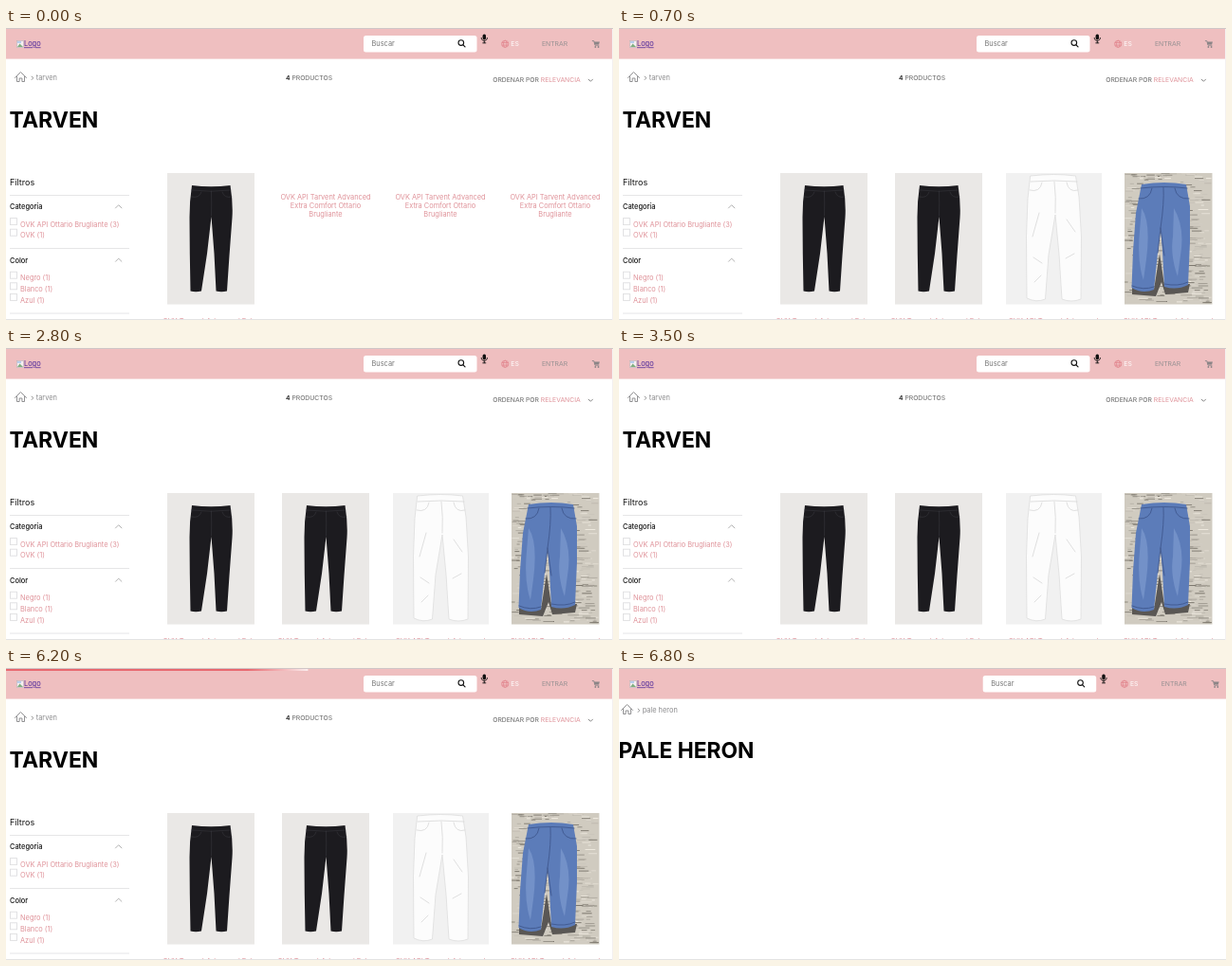
An HTML page that plays this animation: 640 by 308 pixels, repeating every 8 s.

```html
<!DOCTYPE html>
<html lang="es">
<head>
<meta charset="utf-8">
<style>
html, body { margin: 0; width: 100%; height: 100%; overflow: hidden; background: #fff; }
svg { display: block; width: 640px; height: 308px; font-family: Inter, "Open Sans", sans-serif; }
</style>
</head>
<body>
<svg id="stage" viewBox="0 0 640 308"></svg>
<script>
const PINK = '#df9299', GREY = '#8b8b8d', INK = '#111';
const LOOP = 8000, LOADED = 100, BAR = 5400, NEXT = 6500;

const text = (x, y, s, fill = PINK, size = 7.4, extra = '') =>
  `<text x="${x}" y="${y}" fill="${fill}" font-size="${size}" ${extra}>${s}</text>`;
const rect = (x, y, w, h, fill, extra = '') =>
  `<rect x="${x}" y="${y}" width="${w}" height="${h}" fill="${fill}" ${extra}/>`;
const shape = (d, fill) => `<path d="${d}" fill="${fill}"/>`;
const line = (d, stroke, w = 1) =>
  `<path d="${d}" fill="none" stroke="${stroke}" stroke-width="${w}" stroke-linecap="round" stroke-linejoin="round"/>`;
const group = (id, s) => `<g id="${id}">${s}</g>`;
const middle = 'text-anchor="middle"';
const heading = 'font-weight="700"';

// Header tools move together when the scrollbar goes away
const tools =
  rect(377, 8, 119.5, 17.5, '#fff', 'rx="2.5"') +
  text(385.5, 19, 'Buscar', '#777') +
  `<circle cx="479.8" cy="15.6" r="2.8" fill="none" stroke="#111" stroke-width="1.1"/>` +
  line('M482 17.8L484 19.8', INK, 1.2) +
  rect(502.6, 6.5, 3.4, 6, '#111', 'rx="1.7"') +
  line('M501.2 10.5C501 14.6 507.6 14.6 507.4 10.5M504.3 13.7V15.7M502.8 15.8H505.8', INK, .9) +
  `<g fill="none" stroke="#e28890" stroke-width=".8"><circle cx="526.2" cy="16.8" r="3.6"/>
   <ellipse cx="526.2" cy="16.8" rx="1.7" ry="3.6"/><path d="M522.6 15.5H529.8M522.6 18.1H529.8"/></g>` +
  text(532.3, 19.3, 'ES', '#fff', 6.8) +
  text(565, 19.2, 'ENTRAR', '#969092', 6.8) +
  line('M618.3 13.6H619.8L621 18.2H625', '#8c8587', .9) +
  shape('M620 14.4H626L625 17.4H620.8Z', '#8c8587') +
  `<g fill="#8c8587"><circle cx="621.4" cy="20" r=".9"/><circle cx="624.6" cy="20" r=".9"/></g>`;

const header =
  rect(0, 0, 640, 32.6, '#efbfc0') + rect(0, 0, 640, 1, '#cfc6c7') +
  rect(11.5, 13.5, 7, 7, '#f6eef0', 'stroke="#b9b4ba" stroke-width=".6"') +
  shape('M12 20L14.5 16.5L16 18L18 20Z', '#7fae80') + rect(12, 14, 4, 2, '#b9cdec') +
  text(19, 19.4, 'Logo', '#4a2398', 7.4, 'text-decoration="underline"') +
  group('tools', tools);

const crumb = (x, y, name) =>
  line(`M${x} ${y + 6}L${x + 6} ${y}L${x + 12} ${y + 6}M${x + 2} ${y + 5}V${y + 10}H${x + 4.6}V${y + 6.5}H${x + 7.4}V${y + 10}H${x + 10}V${y + 5}`, '#858587', .9) +
  line(`M${x + 17.6} ${y + 4.6}L${x + 19.2} ${y + 6.3}L${x + 17.6} ${y + 8}`, '#777', .8) +
  text(x + 22.2, y + 8.4, name, GREY);

const rule = y => rect(4, y, 126, 1, '#e6e6e7');
const section = (y, name) =>
  text(4, y, name, INK, 7.4, 'font-weight="500"') +
  line(`M115.5 ${y - 1.5}L118.7 ${y - 4.7}L121.9 ${y - 1.5}`, '#aaa', .9);
const option = (y, label) =>
  rect(4.5, y - 9.2, 7, 7, '#fff', 'stroke="#dedee0" stroke-width=".9"') + text(15, y, label);

const filters =
  text(4, 165.8, 'Filtros', INK, 9) + rule(176) + section(191.4, 'Categoría') +
  option(209.8, 'OVK API Ottario Brugliante (3)') + option(221.4, 'OVK (1)') +
  rule(232) + section(247.8, 'Color') +
  option(266.4, 'Negro (1)') + option(278, 'Blanco (1)') + option(289.6, 'Azul (1)') +
  rule(300.5);

const toolbar =
  text(295, 55, '<tspan fill="#222" font-weight="600">4</tspan> PRODUCTOS', '#666', 6.8) +
  text(513.3, 57.2, `ORDENAR POR <tspan fill="${PINK}">RELEVANCIA</tspan>`, '#666', 6.8) +
  line('M614.3 54.2L616.4 56.3L618.5 54.2', '#777', .9);

const black = dx => `<g transform="translate(${dx})">` +
  rect(170, 153, 92, 138.5, '#eae8e6') +
  shape('M196 166Q216 168.5 236.5 166Q239.5 185 238.5 200L235.5 240L233 277.5Q227 279 221.5 277.5L219.5 238L216.5 199L212 238L206 277.5Q200 279 194.5 277.5L193.8 238L193.5 200Q193.5 182 196 166Z', '#1c1b1f') +
  line('M195.5 171Q216 173.5 237 171M195.5 178Q204 180 206 173M238 178Q230 180 228 173M216.5 172Q217 185 216.5 198', '#3c3c42', .5) +
  '</g>';

const whiteCut = 'M434 156Q459 153 481.5 156L485 178L487.5 220L487 286Q477 290 467 286L464 239L460 197L453 239L449.5 286Q440 290 430 285L429.5 220L431 180Z';
const white =
  rect(408, 153, 101, 138.5, '#f1f1f1') + shape(whiteCut, '#fcfcfc') + line(whiteCut, '#dedede', .8) +
  line('M434 162Q459 160 483 162M433 171Q444 174 446 163M484 171Q474 174 472 163M459 162Q461 178 460 195M443 195L436 220M437 242L446 248M472 202L481 215M471 243L480 238M438 268L445 261', '#dcdcdc', .9);

// Weathered boards: seeded streaks running across
let seed = 7;
const rnd = () => (seed = seed * 16807 % 2147483647) / 2147483647;
let grain = '';
for (let i = 0; i < 420; i++) {
  const v = 125 + rnd() * 120 | 0, w = 3 + rnd() * 9;
  grain += rect((533 + rnd() * (92 - w)).toFixed(1), (153 + rnd() * 137).toFixed(1), w.toFixed(1), 1, `rgb(${v},${v - 5},${v - 15})`);
}
const blue =
  rect(533, 153, 92.5, 138.5, '#d0cbc0') + grain +
  shape('M541 274L564 276L570 238L575 271L602 270L600 279L576 281L572 268L566 283L541 281Z', '#5a5754') +
  shape('M551 165Q575 161 598 165L602 188L602 226L600 271Q588 277 575 273L573 235L571 211L568 237L564 276Q552 281 540.5 274L542 235L545 195Z', '#5c7cb9') +
  shape('M551 190Q561 205 556 244L553 266Q546 246 549 214ZM585 190Q597 210 592 240L589 262Q581 240 584 220Z', '#7391c8') +
  line('M550 169Q575 166 599 169M548 180Q560 181 562 169M601 180Q588 181 586 169M574 168Q575 184 571 211L568 237M571 211L575 240M541 272Q553 277 564 273M575 270Q590 273 600 268', '#40598f', .9);

const caption = (x, y, lines) =>
  lines.map((s, i) => text(x, y + i * 9, s, PINK, 7.4, middle)).join('');
const columns = [337, 458, 579];
const product = ['OVK API Tarvent Advanced', 'Extra Comfort Ottario', 'Brugliante'];
const short = 'OVK Tarvent Advanced Extra';

const listing =
  crumb(9.5, 46.5, 'tarven') + toolbar + text(3.6, 104.8, 'TARVEN', '#000', 23, heading) + filters +
  black(0) + caption(216, 311.6, [short]) +
  group('waiting', columns.map(x => caption(x, 181, product)).join('')) +
  group('photos', black(121) + white + blue +
    columns.map((x, i) => caption(x, 311.6, [i ? product[0] : short])).join(''));

const stage = document.getElementById('stage');
stage.innerHTML =
  `<linearGradient id="glow"><stop offset=".8" stop-color="#e8686f"/><stop offset="1" stop-color="#fbeeee"/></linearGradient>` +
  header + group('listing', listing) +
  group('empty', crumb(2.5, 38.5, 'pale heron') + text(-.4, 95, 'PALE HERON', '#000', 22.8, heading)) +
  rect(0, 1, 0, 2, 'url(#glow)', 'id="bar"') +
  rect(0, 307, 640, 1, '#e3e3e3') +
  rect(639, 1, 1, 307, '#f4f0f0', 'id="edge"');

const $ = id => document.getElementById(id);
const show = (id, on) => $(id).setAttribute('display', on ? 'inline' : 'none');

function draw(now) {
  const t = now % LOOP, next = t >= NEXT;
  show('listing', !next);
  show('edge', !next);
  show('empty', next);
  show('waiting', t < LOADED);
  show('photos', t >= LOADED);
  $('tools').setAttribute('transform', `translate(${next ? 6.7 : 0})`);
  $('bar').setAttribute('width', next ? 0 : Math.max(0, (t - BAR) / 800 * 318));
}
const start = performance.now();
function tick(now) {
  draw(Math.max(0, now - start));
  requestAnimationFrame(tick);
}
draw(0);
requestAnimationFrame(tick);
</script>
</body>
</html>
```
